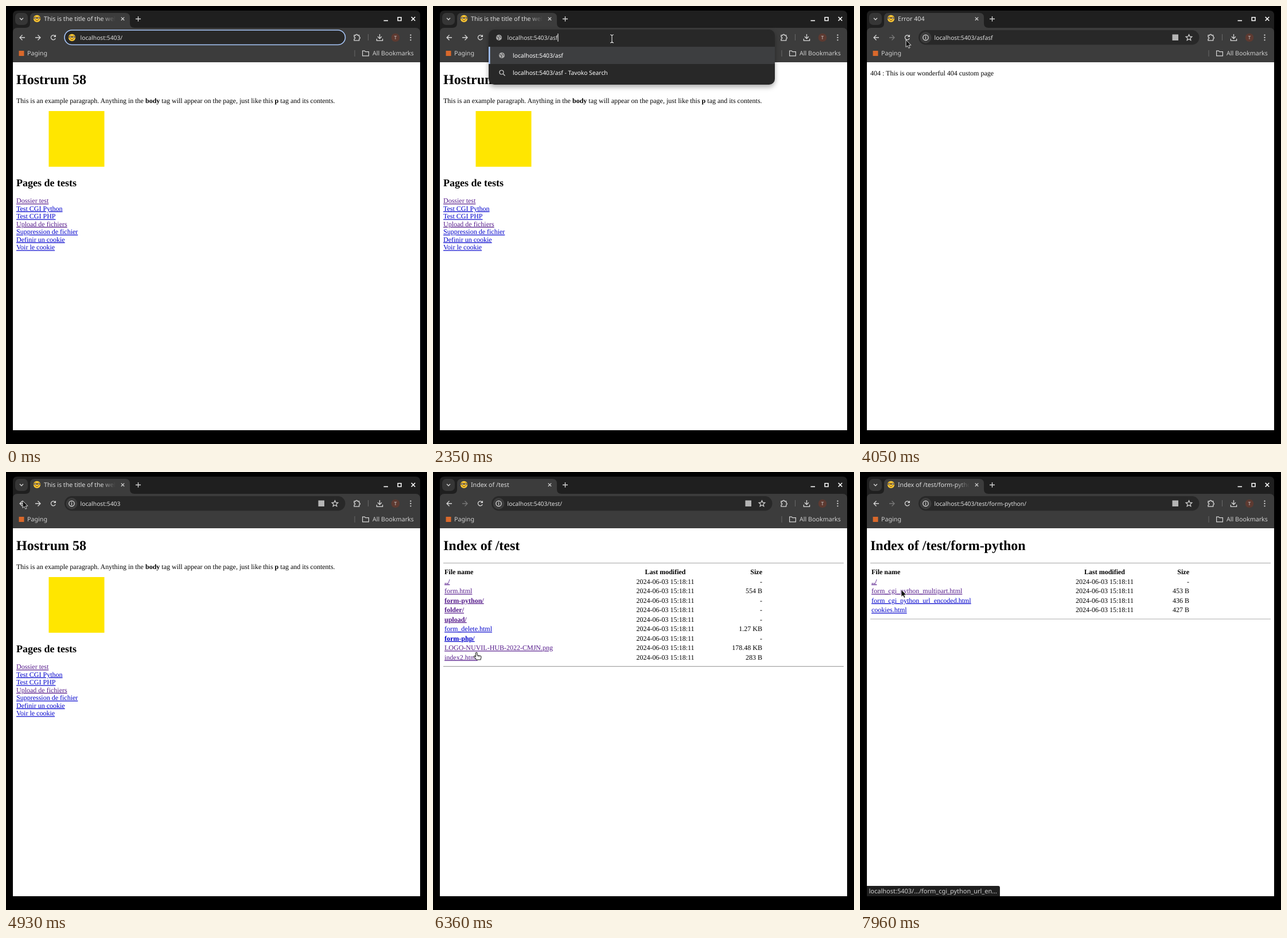
These frames come from a looping animation (734x763 px, 8000 ms). An HTML page:

```html
<!DOCTYPE html>
<html lang="en">
<head>
<meta charset="utf-8">
<title>Browser session</title>
<style>
  html, body { margin: 0; width: 100%; height: 100%; overflow: hidden; background: #000; }
  svg { display: block; width: 734px; height: 763px; }
  text { text-rendering: geometricPrecision; white-space: pre; }
  .ui { font-family: "Noto Sans", sans-serif; }
  .page { font-family: "Liberation Serif", "Times New Roman", serif; }
</style>
</head>
<body>
<svg id="stage" viewBox="0 0 734 763"></svg>
<script>
const LOOP = 8000;
const stage = document.getElementById('stage');
const BLUE = '#0000cc', VISITED = '#551a8b', ACTIVE = '#d80c0c';
const BAR = '#3c3c3c', FIELD = '#282828', LIGHT = '#d6d6d6', DIM = '#777';

// Each timeline entry: [start, value...]; the last one that has started wins.
const last = (list, t) => list.reduce((found, item) => item[0] <= t ? item : found);
const within = (t, a, b) => t >= a && t < b;

const HOST = 'localhost:5403';
const pages = [[0, 'home'], [2920, 'missing'], [4530, 'home'], [6040, 'test'], [7400, 'python']];
const urls = [
  [0, '/'], [2190, '/a'], [2270, '/as'], [2350, '/asf'], [2430, '/asfa'], [2510, '/asfasf'],
  [4530, ''], [6040, '/test/'], [7400, '/test/form-python/']
];
const titles = {
  home: 'This is the title of the webpage', missing: 'Error 404',
  test: 'Index of /test', python: 'Index of /test/form-python'
};
const loading = [[2920, 3000], [4610, 4770], [6040, 6280], [7400, 7560]];
const statuses = [
  [0, '', 0], [5810, '/test/', .2], [5890, '/test/', .5], [5970, '/test/', 1], [6120, '', 0],
  [7160, '/test/form-python/', .5], [7240, '/test/form-python/', 1], [7480, '', 0],
  [7640, '/…/form_cgi_python_url_en…', .5], [7720, '/…/form_cgi_python_url_en…', 1]
];
const pointer = [
  [500, 618, 99, 'arrow'], [740, 530, 74, 'beam'], [980, 410, 53, 'beam'], [1300, 313, 56, 'beam'],
  [1620, 312, 57, 'beam'], [3570, 312, 57, 'beam'], [3810, 190, 57, 'beam'], [3890, 135, 59, 'arrow'],
  [4050, 80, 59, 'arrow'], [4370, 29, 50, 'arrow'], [5090, 29, 50, 'arrow'], [5410, 42, 170, 'arrow'],
  [5730, 57, 335, 'hand'], [5890, 58, 344, 'hand'], [6200, 58, 344, 'hand'], [6280, 66, 328, 'hand'],
  [6360, 76, 317, 'hand'], [6520, 85, 293, 'arrow'], [6760, 84, 252, 'arrow'], [7000, 78, 229, 'hand'],
  [7080, 76, 224, 'hand'], [7640, 74, 223, 'hand'], [7880, 72, 210, 'arrow'], [7960, 72, 205, 'arrow']
];
const STAMP = '2024-06-03 15:18:11';
const files = {
  test: [
    ['../', '-', VISITED], ['form.html', '554 B', VISITED], ['form-python/', '-', VISITED],
    ['folder/', '-', VISITED], ['upload/', '-', VISITED], ['form_delete.html', '1.27 KB', BLUE],
    ['form-php/', '-', BLUE], ['LOGO-NUVIL-HUB-2022-CMJN.png', '178.48 KB', VISITED],
    ['index2.html', '283 B', VISITED]
  ],
  python: [
    ['../', '-', VISITED], ['form_cgi_python_multipart.html', '453 B', VISITED],
    ['form_cgi_python_url_encoded.html', '436 B', BLUE], ['cookies.html', '427 B', BLUE]
  ]
};

const rect = (x, y, w, h, fill, r = 0, extra = '') =>
  `<rect x="${x}" y="${y}" width="${w}" height="${h}" rx="${r}" fill="${fill}" ${extra}/>`;
const disc = (x, y, r, fill) => `<circle cx="${x}" cy="${y}" r="${r}" fill="${fill}"/>`;
const line = (d, color = LIGHT, width = 1.2) =>
  `<path d="${d}" fill="none" stroke="${color}" stroke-width="${width}"/>`;
const text = (cls, x, y, size, fill, str, extra = '') =>
  `<text class="${cls}" x="${x}" y="${y}" font-size="${size}" fill="${fill}" ${extra}>${str}</text>`;
const ui = (...args) => text('ui', ...args);
const serif = (x, y, str, extra = '', size = 12, fill = '#000') =>
  text('page', x, y, size, fill, str, extra);
const BOLD = 'font-weight="700"', CENTER = 'text-anchor="middle"', END = 'text-anchor="end"';
const link = (x, y, str, fill, extra = '') =>
  serif(x, y, str, `text-decoration="underline" ${extra}`, 12, fill);

const ruler = document.createElement('canvas').getContext('2d');
function uiWidth(str, size) {
  ruler.font = `${size * 10}px "Noto Sans", sans-serif`;
  return ruler.measureText(str).width / 10;
}

const face = (x, y) => disc(x, y, 6.2, '#fcc934') +
  rect(x - 5.6, y - 3, 5, 3.8, '#5b4522', 1.5) + rect(x + .6, y - 3, 5, 3.8, '#5b4522', 1.5) +
  line(`M${x - 1} ${y - 2}h2`, '#5b4522', 1) +
  disc(x - 3.1, y - 1.1, 1, '#fff') + disc(x + 3.1, y - 1.1, 1, '#fff') +
  line(`M${x - 2.6} ${y + 2.7}q2.6 2 5.2 0`, '#7a4a12', 1);

const globe = (x, y, r) => disc(x, y, r, '#a9a9a9') +
  line(`M${x - r * .8} ${y - r * .3}l${r * .8} ${r * .3}l${-r * .2} ${r * .8}M${x + r * .1} ${y - r * .8}l${r * .2} ${r * .5}l${r * .5} ${r * .3}`, BAR, 1);

const arrowIcon = (x, dir, color) => line(`M${x - 4.5 * dir} 55h9M${x} 50.5`.replace(/h9/, `h${9 * dir}`) +
  `M${x} 50.5l${4.5 * dir} 4.5l${-4.5 * dir} 4.5`, color, 1.3);

function chrome(page, t) {
  const busy = loading.some(([a, b]) => within(t, a, b));
  const canForward = page === 'home';
  return `<path d="M12 98V16q0-8 8-8H714q8 0 8 8V98z" fill="#1f1f1f"/>` +
    `<path d="M12 98V46q0-8 8-8H34q8 0 8-8V20q0-8 8-8H208q8 0 8 8V30q0 8 8 8H714q8 0 8 8V98z" fill="${BAR}"/>` +
    rect(16, 12, 22, 21, '#363636', 7) + line('M24 21l3 3l3-3', LIGHT, 1.3) +
    (busy ? globe(54, 22, 4) : face(54, 22)) +
    `<g clip-path="url(#tab)">${ui(66, 26, 10.7, '#dedede', titles[page])}</g>` +
    rect(166, 14, 25, 20, 'url(#fade)') +
    line('M200.8 19.6l5.4 5.4m0-5.4l-5.4 5.4') +
    line('M226 22.5h9M230.5 18v9', LIGHT, 1.3) +
    line('M658.5 25.5h7.5', '#fff', 1.6) +
    line('M683.2 19.7h5.8v5.8h-5.8z', '#fff', 1.5) +
    line('M706.7 19l6.6 6.8m0-6.8l-6.6 6.8', '#fff', 1.6) +
    arrowIcon(28.5, -1, LIGHT) + arrowIcon(55.5, 1, canForward ? LIGHT : DIM) +
    line('M86.2 56.2a4 4 0 1 1-.9-4.2', LIGHT, 1.3) + `<path d="M87 49.8v4.3h-4.3z" fill="${LIGHT}"/>` +
    line('M607 51h2.7a1.6 1.6 0 0 1 3.2 0h2.8v2.9a1.6 1.6 0 0 1 0 3.2v3h-8.7v-2.8a1.6 1.6 0 0 0 0-3.3z', LIGHT, 1.3) +
    rect(631, 49, 1, 11, '#686868') +
    line('M651.5 49v7.5M648 53.3l3.5 3.5l3.5-3.5M646.4 57v3.3h10.2V57', LIGHT, 1.3) +
    disc(679, 55, 7.3, '#5d3a31') + ui(679, 58, 8, '#ddd', 'T', CENTER) +
    [50.7, 55, 59.3].map(y => disc(705.5, y, 1.15, LIGHT)).join('') +
    rect(22.5, 78, 9, 9, '#d9682b') + ui(37, 86.3, 10.7, '#cfcfcf', 'Paging') +
    rect(607.5, 77, 1, 11, '#686868') +
    line('M621.6 78.2h3.7l1.4 1.5h5.7v7.1h-10.8z', LIGHT, 1.2) +
    ui(639, 86.3, 10.7, '#cfcfcf', 'All Bookmarks');
}

function popup(url, opacity) {
  const row = (y, icon, str) => icon + ui(139, y, 10.3, '#fff', str);
  return `<g opacity="${opacity}" style="filter:drop-shadow(0 4px 4px #0005)">` +
    rect(97, 41, 499, 96, FIELD, 10) + rect(97, 71, 499, 30, '#3d3e40') +
    rect(97, 71, 2.5, 30, '#a8c7fa') +
    row(89.7, globe(120, 86, 5), url) +
    row(119.7, line('M122.5 118.5l3 3') + `<circle cx="119.5" cy="115.5" r="3.5" fill="none" stroke="${LIGHT}" stroke-width="1.2"/>`,
      `${url} - Tavoko Search`) + '</g>';
}

function omnibox(url, t) {
  const focused = t < 2920, typing = within(t, 2190, 2920);
  const ring = focused && !typing ? 'stroke="#a8c7fa" stroke-width="1.6"' : '';
  const end = 129.5 + uiWidth(url, 10.3);
  const caret = within(t, 500, 1000) || within(t, 1540, 2030) || typing;
  let out = rect(102, 42, 489.5, 25.5, FIELD, 12.75, ring);
  if (within(t, 1220, 1460)) out += rect(129, 48, end - 129, 14, '#004a77');
  if (typing) out += globe(115, 55, 5);
  else if (focused) out += face(115, 55);
  else {
    out += disc(114.5, 55, 10, BAR) +
      `<circle cx="114.5" cy="55" r="4.7" fill="none" stroke="#e3e3e3" stroke-width="1.2"/>` +
      line('M114.5 54.3v3.2M114.5 52.2v1.3', '#e3e3e3', 1.2) +
      rect(544.5, 49.5, 10.5, 10.5, '#b5b5b5') +
      line('M573.5 49.7l1.5 3.5l3.8.3l-2.9 2.5l.9 3.7l-3.3-2l-3.3 2l.9-3.7l-2.9-2.5l3.8-.3z', LIGHT, 1.2);
  }
  out += ui(129.5, 58.7, 10.3, '#dedede', url);
  if (caret) out += rect(end, 48, 1, 14, '#fff');
  return out;
}

function homePage(t) {
  const links = ['Dossier test', 'Test CGI Python', 'Test CGI PHP', 'Upload de fichiers',
    'Suppression de fichier', 'Definir un cookie', 'Voir le cookie'];
  const color = i => i === 0 && t >= 5890 ? ACTIVE : i % 3 === 0 && i < 6 ? VISITED : BLUE;
  const b = str => `<tspan ${BOLD}>${str}</tspan>`;
  return serif(18, 136, 'Hostrum 58', BOLD, 24) +
    serif(18, 168.6, `This is an example paragraph. Anything in the ${b('body')} tag will appear on the page, just like this ${b('p')} tag and its contents.`) +
    rect(74.5, 183, 97, 97, '#ffe600') +
    serif(18, 313.5, 'Pages de tests', BOLD, 18) +
    links.map((str, i) => link(18, 343.3 + 13.5 * i, str, color(i))).join('');
}

function listing(page, t) {
  const rows = files[page], mid = page === 'test' ? 405 : 426.5;
  const rule = y => rect(18, y, 698, .8, '#8c8c8c') + rect(18, y + .8, 698, .7, '#e4e4e4');
  const pressed = name => page === 'test' && name === 'form-python/' && t >= 7240;
  return serif(18, 136, titles[page], BOLD, 24) + rule(158) +
    serif(20, 178.3, 'File name', BOLD) + serif(mid, 178.3, 'Last modified', `${BOLD} ${CENTER}`) +
    serif(574, 178.3, 'Size', `${BOLD} ${END}`) +
    rows.map(([name, size, color], i) => {
      const y = 194.8 + 16.5 * i;
      return link(20, y, name, pressed(name) ? ACTIVE : color, name.endsWith('/') ? BOLD : '') +
        serif(mid, y, STAMP, CENTER) + serif(574, y, size, END);
    }).join('') + rule(173.2 + 16.5 * (rows.length + 1));
}

function content(page, t) {
  if (page === 'home') return homePage(t);
  if (page === 'missing') return serif(18, 120.7, '404 : This is our wonderful 404 custom page');
  return listing(page, t);
}

function statusBubble(t) {
  const [, path, opacity] = last(statuses, t);
  if (!opacity) return '';
  const str = HOST + path, right = 20.5 + uiWidth(str, 11);
  return `<g opacity="${opacity}"><path d="M12 739V721H${right - 3}q3 0 3 3V739z" fill="#1f1f1f"/>` +
    ui(15.5, 733.8, 11, '#d0d0d0', str) + '</g>';
}

const cursors = {
  arrow: '<path d="M0 0V12.6L2.9 10L4.9 14.4L7 13.5L5.1 9.2H9z" fill="#111" stroke="#fff" stroke-width=".8"/>',
  beam: '<path d="M-3-7q3 0 3 2q0-2 3-2M0-5V5M-3 7q3 0 3-2q0 2 3 2" fill="none" stroke="#111" stroke-width="2.6"/>' +
    '<path d="M-3-7q3 0 3 2q0-2 3-2M0-5V5M-3 7q3 0 3-2q0 2 3 2" fill="none" stroke="#fff" stroke-width="1.1"/>',
  hand: '<path d="M-1.5-2q1.3-1.6 2.5 0V2l5.5 1.3q1.7.5 1.5 2.2L7 10H0L-4.5 5q-.3-2 1.4-1.6L-1.5 4.8z" fill="#fff" stroke="#222" stroke-width="1.1"/>' +
    '<path d="M2.6 3v2.2M4.8 3.5v2" stroke="#222" stroke-width=".8"/>'
};

function cursor(t) {
  if (t < 500) return '';
  const i = pointer.findLastIndex(key => key[0] <= t);
  const [t0, x0, y0, kind] = pointer[i];
  const [t1, x1, y1] = pointer[i + 1] || [t0 + 1, x0, y0];
  const k = Math.min(1, Math.floor((t - t0) / 80) * 80 / (t1 - t0));
  return `<g transform="translate(${x0 + (x1 - x0) * k} ${y0 + (y1 - y0) * k})">${cursors[kind]}</g>`;
}

const defs = `<defs><clipPath id="tab"><rect x="66" y="12" width="124.5" height="24"/></clipPath>
  <linearGradient id="fade"><stop stop-color="${BAR}" stop-opacity="0"/><stop offset="1" stop-color="${BAR}"/></linearGradient></defs>`;

function scene(t) {
  const page = last(pages, t)[1], url = HOST + last(urls, t)[1];
  const popupOpacity = within(t, 2190, 2920) ? 1 : within(t, 2920, 3000) ? .1 : 0;
  return defs + rect(0, 0, 734, 763, '#000') + rect(12, 98, 710, 641, '#fff') +
    chrome(page, t) + content(page, t) + (popupOpacity ? popup(url, popupOpacity) : '') +
    omnibox(url, t) + statusBubble(t) + cursor(t);
}

let shown = '';
function draw(now) {
  const markup = scene(now % LOOP);
  if (markup !== shown) stage.innerHTML = shown = markup;
  requestAnimationFrame(draw);
}
draw(performance.now());
</script>
</body>
</html>
```
